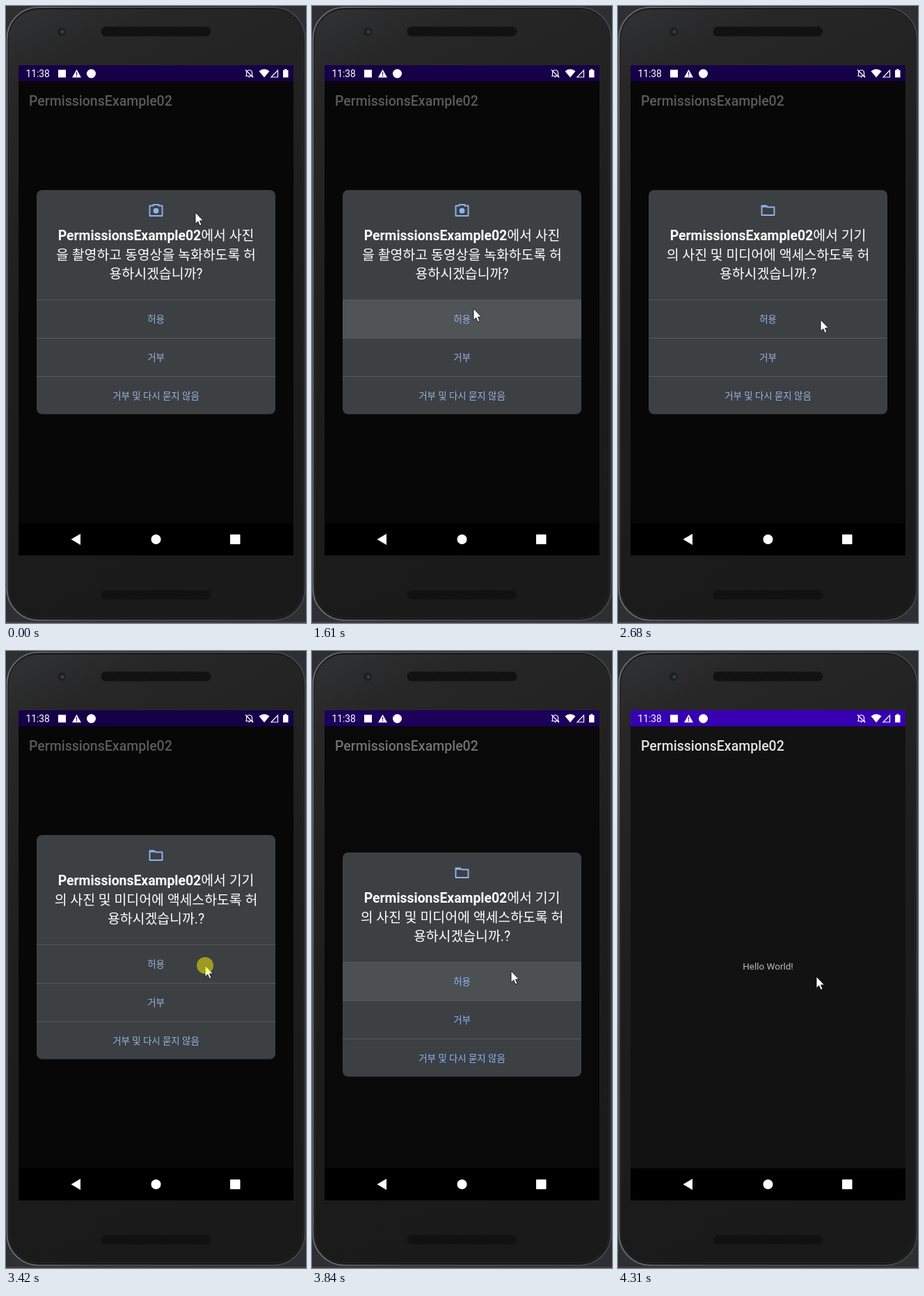
An HTML page for the animation above (6.64 s loop, 431 by 885 pixels).

```html
<!DOCTYPE html>
<html lang="ko">
<head>
<meta charset="utf-8">
<style>
html, body { margin: 0; width: 100%; height: 100%; overflow: hidden; background: #2e2f32; }
svg { display: block; width: 431px; height: 885px; font-family: Roboto, "Noto Sans CJK KR", sans-serif; }
.mid { text-anchor: middle; }
.ask { font-size: 19.4px; fill: #fff; }
.ask tspan { font-weight: 700; }
.btn { font-size: 13.44px; }
.icon { fill: none; stroke: #8fb2f0; stroke-width: 1.9; stroke-linejoin: round; }
.line { fill: none; stroke: #fff; stroke-width: 1.2; }
</style>
</head>
<body>
<svg viewBox="0 0 431 885">
  <defs>
    <linearGradient id="shell" x2=".25" y2="1">
      <stop offset="0" stop-color="#313233"/>
      <stop offset=".12" stop-color="#272728"/>
      <stop offset=".5" stop-color="#1e1e1f"/>
      <stop offset="1" stop-color="#1a1a1a"/>
    </linearGradient>
    <linearGradient id="rim" x2="1" y2="0">
      <stop offset="0" stop-color="#666871"/>
      <stop offset=".3" stop-color="#4b4c50"/>
      <stop offset="1" stop-color="#414246"/>
    </linearGradient>
    <pattern id="mesh" width="4" height="4" patternUnits="userSpaceOnUse">
      <rect width="4" height="4" fill="#191919"/>
      <circle cx="1" cy="1" r="1" fill="#050505"/>
      <circle cx="3" cy="3" r="1" fill="#050505"/>
    </pattern>
  </defs>

  <!-- phone body -->
  <rect y="883" width="431" height="2" fill="#453b40"/>
  <rect x="1.5" y="2" width="428" height="879" rx="45" fill="#0f0f10" stroke="url(#rim)" stroke-width="2"/>
  <rect x="4" y="5" width="423" height="873" rx="42" fill="url(#shell)" stroke="#2c2d2e"/>
  <rect id="speaker" x="137" y="30" width="157" height="13" rx="6" fill="url(#mesh)" stroke="#141414"/>
  <use href="#speaker" y="808"/>
  <circle cx="80" cy="37" r="6.5" fill="#1d1f20" stroke="#292b2c"/>
  <circle cx="81" cy="37" r="2.5" fill="#39413f"/>

  <!-- app -->
  <rect x="18" y="85" width="395" height="703" fill="#121212"/>
  <rect x="18" y="85" width="395" height="23" fill="#3700b3"/>
  <text x="33" y="142.5" font-size="19.5" font-weight="500" fill="#e3e3e3">PermissionsExample02</text>
  <text class="mid" x="215.5" y="457" font-size="13.44" fill="#b9b9b9">Hello World!</text>
  <rect id="dim" x="18" y="85" width="395" height="657"/>

  <!-- status bar icons -->
  <g fill="#fff">
    <text x="28.5" y="102" font-size="13.8">11:38</text>
    <rect x="75" y="91.5" width="11" height="11"/>
    <path d="M101.5 91L108 102.5H95Z"/>
    <path d="M101.5 95v3.500M101.5 99.500v1.500" stroke="#26007a" stroke-width="1.3"/>
    <circle cx="122.5" cy="97" r="6.5"/>
    <path class="line" d="M345.5 100.5V96q0-4 4-4t4 4v4.500M344 100.5h11M344 91.5l11 11"/>
    <path d="M348 101.5h3l-1.500 1.500Z"/>
    <path d="M363.5 93.5Q371 87.500 378.5 93.5L371 102.5Z"/>
    <path class="line" d="M381 102L390.5 92.300V102Z"/>
    <path d="M398 92h2v-1.500h3.500V92h2v10.500h-7.500Z"/>
  </g>

  <!-- navigation bar -->
  <rect x="18" y="742" width="395" height="46"/>
  <g fill="#fff">
    <path d="M93.500 765L107 757V773Z"/>
    <circle cx="215.5" cy="765" r="7"/>
    <rect x="322" y="758" width="14.5" height="14" rx="1"/>
  </g>

  <g id="dialog">
    <rect x="44" y="264" width="343" height="321.5" rx="8" fill="#3c4043"/>
    <rect id="glow" x="44" y="422" width="343" height="54" fill="#fff"/>
    <path d="M44 421.5h343m-343 55h343m-343 55h343" stroke="#56595c"/>
    <g id="camera">
      <path class="icon" d="M206.5 286.500h5v-1.500h8v1.500h5v14.500h-18Z"/>
      <circle cx="215.5" cy="293.700" r="3.9" fill="#8fb2f0"/>
      <g class="mid ask">
        <text x="215.5" y="336"><tspan>PermissionsExample02</tspan>에서 사진</text>
        <text x="215.5" y="363.5">을 촬영하고 동영상을 녹화하도록 허</text>
        <text x="215.5" y="391">용하시겠습니까?</text>
      </g>
    </g>
    <g id="folder">
      <path class="icon" d="M206.5 286.500h6.500l2 2h9.500v11.500h-18Zm0 1.200h7"/>
      <g class="mid ask">
        <text x="215.5" y="336"><tspan>PermissionsExample02</tspan>에서 기기</text>
        <text x="215.5" y="363.5">의 사진 및 미디어에 액세스하도록 허</text>
        <text x="215.5" y="391">용하시겠습니까.?</text>
      </g>
    </g>
    <g id="buttons" class="mid btn">
      <text x="215.5" y="453.7">허용</text>
      <text x="215.5" y="508.7">거부</text>
      <text x="215.5" y="563.7">거부 및 다시 묻지 않음</text>
    </g>
  </g>

  <g id="pointer">
    <path d="M0 0V16.500L3.700 13L6.300 19L9 17.800L6.500 12H11.500Z" fill="#fff" stroke="#111" stroke-width=".9"/>
    <circle id="tap" r="12" fill="#fff500" fill-opacity=".5"/>
  </g>
</svg>
<script>
const LOOP = 6640, TAP1 = 1410, TAP2 = 3420;
const $ = id => document.getElementById(id);

// Pointer strokes, stepped like a screen recording; the powers bend each path.
const strokes = [
  { from: 710, to: 1340, steps: 10, x: 232, y: 433, powX: 1.8, powY: .7 },
  { from: TAP1, to: 2010, steps: 9, x: 293, y: 459, powX: 5, powY: 3 },
  { from: 2270, to: 2880, steps: 8, x: 288, y: 449, powX: 2, powY: .2 },
  { from: 2950, to: 3090, steps: 3, x: 286, y: 451, powX: 1, powY: 1 },
  { from: TAP2, to: 4040, steps: 10, x: 285, y: 465, powX: 2, powY: 1.6 },
  { from: 4110, to: 4310, steps: 4, x: 285, y: 467, powX: 1, powY: 1 },
];

// Time of the step on screen and the pointer's place in it.
function stateAt(now) {
  let t = 0, x = 272, y = 296;
  for (const s of strokes) {
    if (now < s.from) break;
    const gap = (s.to - s.from) / (s.steps - 1);
    const step = Math.min(s.steps - 1, Math.floor((now - s.from) / gap + 1e-6));
    const p = (step + 1) / s.steps;
    t = s.from + step * gap;
    x += (s.x - x) * p ** s.powX;
    y += (s.y - y) * p ** s.powY;
  }
  return { t, x: Math.round(x), y: Math.round(y) };
}

const ramp = (t, a, b) => Math.min(1, Math.max(0, (t - a) / (b - a)));
const rowGlow = age => .1 * (ramp(age, 0, 150) - ramp(age, 375, 600));
const pressed = age => age >= 0 && age < 138 - 1;
const set = (id, name, value) => $(id).setAttribute(name, value);
const show = (id, on) => set(id, "visibility", on ? "visible" : "hidden");
const move = (id, x, y) => set(id, "transform", `translate(${x} ${y})`);

function draw(now) {
  const { t, x, y } = stateAt(now % LOOP);
  const second = t > TAP1 + 290;
  move("pointer", x, y);
  show("tap", pressed(t - TAP1) || pressed(t - TAP2));
  show("camera", !second);
  show("folder", second);
  set("glow", "opacity", rowGlow(t - TAP1) + rowGlow(t - TAP2));

  // closing: the dialog sinks and fades while the dimming lifts
  move("dialog", 0, Math.round(56 * ramp(t, 3695, 3902) ** 2));
  set("dialog", "opacity", 1 - ramp(t, 3835, 3971));
  set("dim", "opacity", .6 * (1 - ramp(t, 3690, 4040) ** 2));
  set("buttons", "fill", t > 3700 ? "#8ab4f8" : "#9ab1e0");
  requestAnimationFrame(draw);
}
requestAnimationFrame(draw);
</script>
</body>
</html>
```
